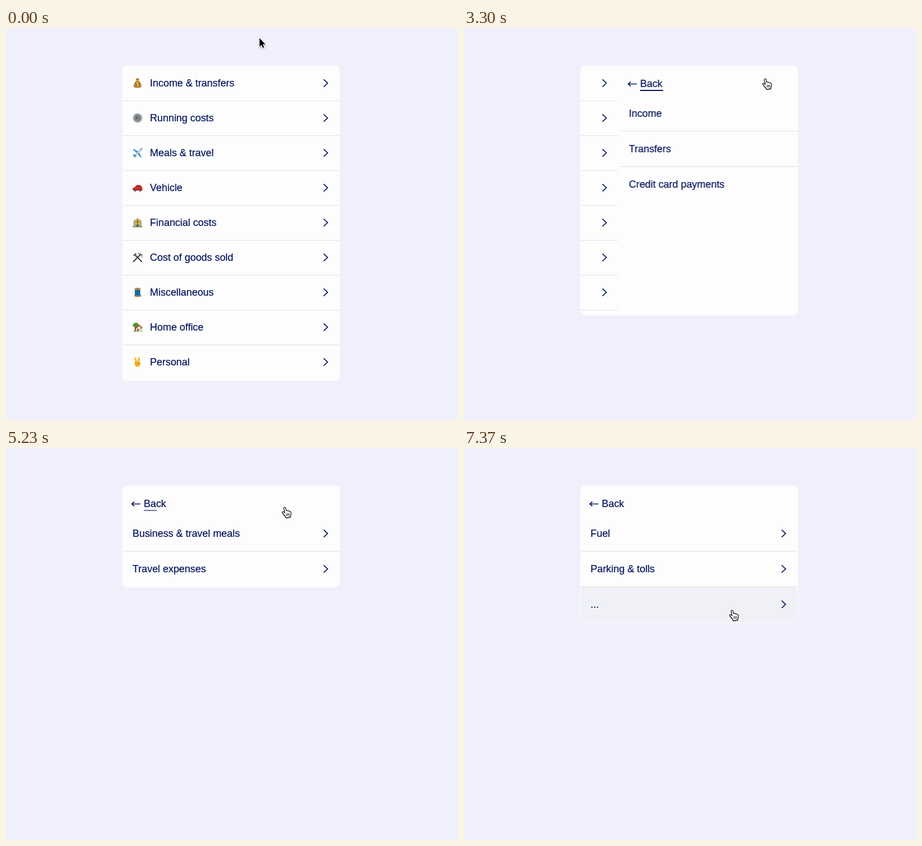
These frames come from a looping animation (804 by 697 pixels, 8000 ms). An HTML page:

```html
<!DOCTYPE html>
<html lang="en">
<head>
<meta charset="utf-8">
<title>Category menu</title>
<style>
:root { --ink: #02145a; --card: #fdfdfd; --hover: #f0f1f6; --loop: 8s; }
html, body { margin: 0; width: 100%; height: 100%; overflow: hidden; background: #f0f0fd; }
body { position: relative; font: 18px/20px "Liberation Sans", Arial, sans-serif; letter-spacing: -.05px; color: var(--ink); -webkit-text-stroke: .2px var(--ink); }
svg { position: absolute; overflow: visible; }
.card { position: absolute; left: 207px; top: 66.5px; width: 387px; height: 560.5px; border-radius: 8px; background: var(--card); overflow: hidden; animation: height var(--loop) infinite; }
.track { position: absolute; inset: 0; animation: slide var(--loop) infinite; }
.list { position: absolute; left: 0; top: 1px; width: 387px; }
.sub { left: 387px; padding-top: 53px; }
.row { position: relative; box-sizing: border-box; margin: 0 1px; height: 62.05px; border-bottom: 1px solid #dfe0e6; animation: var(--loop) linear infinite; }
.sub .row { height: 63.1px; }
.row:last-child { border-bottom-color: transparent; border-radius: 0 0 7px 7px; }
.main .row:first-child { border-radius: 7px 7px 0 0; }
.row span { position: absolute; left: 48.1px; top: 50%; transform: translateY(-50%); white-space: nowrap; }
.sub .row span { left: 17px; }
.row .icon { left: 17px; top: 50%; margin-top: -9px; width: 18px; height: 18px; }
.row .go { left: 356px; top: 50%; margin-top: -7px; width: 9px; height: 14px; }
.back { position: absolute; left: 16px; top: 21px; }
.back svg { left: 0; top: 5.5px; width: 16px; height: 11px; }
.back span { position: absolute; left: 22px; }
.back i { position: absolute; left: 22.3px; top: 21.5px; width: 40.5px; height: 2px; background: var(--ink); transform: scale(0); transform-origin: 0 50%; animation: var(--loop) linear infinite; }
.line { fill: none; stroke: var(--ink); stroke-width: 1.7; }
.cursor { position: absolute; left: 0; top: 0; animation: move var(--loop) infinite; }
.cursor svg { left: 0; top: 0; width: 1px; height: 1px; animation: var(--loop) step-end infinite; }
.cursor .arrow { animation-name: arrow; filter: drop-shadow(0 1px 1px #0006); }
.cursor .hand { left: .5px; animation-name: hand; filter: drop-shadow(0 1px .7px #0004); }

#income { animation: showA var(--loop) step-end infinite; }
#meals { animation: showB var(--loop) step-end infinite; }
#vehicle { animation: showC var(--loop) step-end infinite; }
.main .row:nth-child(1) { animation-name: hoverIncome; }
.main .row:nth-child(2) { animation-name: hoverRunning; }
.main .row:nth-child(3) { animation-name: hoverMeals; }
.main .row:nth-child(4) { animation-name: hoverVehicle; }
#meals .row:nth-child(2) { animation-name: hoverBusiness; }
#meals .row:nth-child(3) { animation-name: hoverTravel; }
#vehicle .row:nth-child(4) { animation-name: hoverMore; }
#income i { animation-name: lineIncome; }
#meals i { animation-name: lineMeals; }

@keyframes slide {
  0%, 20.88%, 43.98%, 56.25%, 74.75%, 87.31% { transform: none; animation-timing-function: cubic-bezier(.77, 0, .175, 1); }
  25.25%, 39.61%, 60.63%, 70.38%, 91.69%, 100% { transform: translateX(-387px); animation-timing-function: cubic-bezier(.77, 0, .175, 1); }
}
@keyframes height {
  0%, 20.82%, 44.03%, 56.25%, 74.75%, 87.31% { height: 560.5px; animation-timing-function: ease; }
  25.19%, 39.65%, 91.69%, 100% { height: 244px; animation-timing-function: ease; }
  60.63%, 70.38% { height: 181px; animation-timing-function: ease; }
}
@keyframes move {
  0%, .3% { transform: translate(451px, 18px); animation-timing-function: ease-in-out; }
  5.2% { transform: translate(687px, 34px); animation-timing-function: ease-in-out; }
  10.6% { transform: translate(551px, 20px); animation-timing-function: ease-in-out; }
  20%, 23.5% { transform: translate(482px, 92px); animation-timing-function: ease-in-out; }
  29.1%, 31.1% { transform: translate(711px, 130px); animation-timing-function: ease-in-out; }
  39.4%, 42.5% { transform: translate(535px, 91px); animation-timing-function: ease-in; }
  47.88% { transform: translate(539px, 186px); animation-timing-function: ease-out; }
  52.5%, 58.1% { transform: translate(530px, 222px); animation-timing-function: ease-in-out; }
  65.38% { transform: translate(495px, 106px); animation-timing-function: ease-out; }
  68.1%, 71.25% { transform: translate(492px, 98px); animation-timing-function: ease-in-out; }
  80.6%, 100% { transform: translate(476px, 289px); }
}
@keyframes arrow { 0%, 26.3% { opacity: 1; } 16.25%, 36.1%, 100% { opacity: 0; } }
@keyframes hand { 0%, 26.3% { opacity: 0; } 16.25%, 36.1%, 100% { opacity: 1; } }
@keyframes showA { 0% { opacity: 1; } 55%, 100% { opacity: 0; } }
@keyframes showB { 0%, 85%, 100% { opacity: 0; } 55% { opacity: 1; } }
@keyframes showC { 0% { opacity: 0; } 85%, 100% { opacity: 1; } }
@keyframes hoverIncome {
  0%, 16.25%, 26%, 42.5%, 47.5%, 73.1%, 76.9%, 100% { background: transparent; }
  18.75%, 23.75%, 44.5%, 45.7%, 75% { background: var(--hover); }
}
@keyframes hoverRunning {
  0%, 45.9%, 50.6%, 75%, 78.7%, 100% { background: transparent; }
  48.6%, 76.6% { background: var(--hover); }
}
@keyframes hoverMeals {
  0%, 48.4%, 60.5%, 76.5%, 80%, 100% { background: transparent; }
  50.9%, 58.75%, 78% { background: var(--hover); }
}
@keyframes hoverVehicle {
  0%, 78%, 91%, 100% { background: transparent; }
  80.5%, 89.5% { background: var(--hover); }
}
@keyframes hoverBusiness {
  0%, 61.1%, 65.2%, 100% { background: transparent; }
  63.3% { background: var(--hover); }
}
@keyframes hoverTravel {
  0%, 58.75%, 62.9%, 100% { background: transparent; }
  60.6%, 61.1% { background: var(--hover); }
}
@keyframes hoverMore { 0%, 89.5% { background: transparent; } 91.9%, 100% { background: var(--hover); } }
@keyframes lineIncome {
  0%, 23.5%, 28.9%, 36.1%, 55%, 100% { transform: scale(0); }
  26.3% { transform: scale(.85); }
  39.4%, 44% { transform: scale(1); }
}
@keyframes lineMeals {
  0%, 63.5%, 85%, 100% { transform: scale(0); }
  66.8%, 75% { transform: scale(1); }
}
</style>
</head>
<body>
<svg width="0" height="0">
  <symbol id="bag" viewBox="0 0 18 18">
    <path d="M6 1.2q3-1.2 6 0L10.8 4.6H7.2Z" fill="#a8762c"/>
    <path d="M7 5h4c3 2 5 6 4.800 9.500q-.3 2.700-3 2.700H5.200q-2.700 0-3-2.700C2 11 4 7 7 5Z" fill="#b98534"/>
    <path d="M6.500 4.700h5" stroke="#e5b84a" stroke-width="1.400" stroke-linecap="round"/>
    <path d="M11.300 8.800C9.500 7.500 6.700 8 7 9.800s4.300 1 4.200 3-3 2.200-4.600.8M9 7v8.500" fill="none" stroke="#4a2e0c" stroke-width="2.400"/>
    <path d="M11.300 8.800C9.500 7.500 6.700 8 7 9.800s4.300 1 4.200 3-3 2.200-4.600.8M9 7v8.500" fill="none" stroke="#ffe37a" stroke-width="1.200"/>
  </symbol>
  <symbol id="gear" viewBox="0 0 18 18">
    <circle cx="9" cy="9" r="7.600" fill="none" stroke="#858c91" stroke-width="2" stroke-dasharray="1.700 1.280"/>
    <circle cx="9" cy="9" r="5.600" fill="#b4babe" stroke="#7d8488" stroke-width="2.400"/>
    <circle cx="9" cy="9" r="3.200" fill="#8b9297" stroke="#4b5054" stroke-width="1.200"/>
    <path d="M9 9 12.500 6M9 9v4" stroke="#d6dadc"/>
    <circle cx="9" cy="9" r="1.300" fill="#33383b"/>
  </symbol>
  <symbol id="plane" viewBox="0 0 18 18">
    <path d="M11 7 2 2 .8 3.400 8 9.500ZM11 7l5 9-1.400 1.200L8.500 10ZM5 12.500l-4-.7-.7.9L4 14.500ZM5.500 13l.7 4-.9.700L3.500 14Z" fill="#2f97c9"/>
    <path d="M17.500.5c.6 1.200-.5 3-2 4.500L4.500 15.700q-2 1.600-2.300 0L13 2.500Q16-.2 17.500.5Z" fill="#c9dbe4" stroke="#6e94a8" stroke-width=".6"/>
    <path d="M15 2.200l1 .9M2.500 15.500l3-3" stroke="#175f8c" stroke-width="1.200"/>
  </symbol>
  <symbol id="car" viewBox="0 0 18 18">
    <path d="M.5 10.500Q1.500 8.500 4 8l3-3.300Q8 4 10 4h3q2 .2 2.800 2.200l1.500 2.300q.7 3.200 0 5.300H2Q0 13.500.5 10.500Z" fill="#e3281f"/>
    <path d="M5.500 8 8 5.400h2V8ZM11 5.400h2.300q1 .2 1.700 2.600h-4Z" fill="#434e5c"/>
    <path d="M1 10.600h2.500M.8 12.600h16.500" stroke="#8e0f12"/>
    <circle cx="4.700" cy="13.600" r="2.100" fill="#25272b"/><circle cx="13.500" cy="13.600" r="2.100" fill="#25272b"/>
    <circle cx="4.700" cy="13.600" r="1" fill="#b7babd"/><circle cx="13.500" cy="13.600" r="1" fill="#b7babd"/>
  </symbol>
  <symbol id="bank" viewBox="0 0 18 18">
    <path d="M2 6.500h14V16H2Z" fill="#6d7165"/>
    <path d="M3.500 7v8.500M6 7v8.500M12 7v8.500M14.500 7v8.500" stroke="#d9d3ad" stroke-width="1.400"/>
    <path d="M.5 6.800 9 .8l8.500 6Z" fill="#b4ad86"/>
    <path d="M.5 15.300h17V17.500H.5Z" fill="#9b956f"/>
    <path d="M6 3.500h6V12H6Z" fill="#e9c22e"/>
    <path d="M10.700 5.700C9 4.700 7.300 5.500 7.600 6.800s2.900.7 2.800 2-1.900 1.600-3.100.5M9 4.500v6.300" fill="none" stroke="#5b4a08"/>
    <path d="M7.300 12.800h3.400v3H7.300Z" fill="#4a4d48"/>
  </symbol>
  <symbol id="tools" viewBox="0 0 18 18">
    <path d="M4 4 16.500 16.500M14 4 1.500 16.500" stroke="#3a3433" stroke-width="1.800" stroke-linecap="round"/>
    <path d="M8.500 1.600q6-.4 7.800 1.800t.8 6.300q-1-4.500-3-5.500T8.500 1.600Z" fill="#54585b"/>
    <path d="M1 5.200 5 1.300l2.300.5L6 3.300 6.700 4.800 4.800 6.700 3.300 6 2.500 6.800Z" fill="#606569"/>
  </symbol>
  <symbol id="spool" viewBox="0 0 18 18">
    <path d="M4.200 3h9.600v12H4.200Z" fill="#1878b5"/>
    <path d="M4.200 5.800l9.600-1M4.200 8.200l9.600-1M4.200 10.600l9.600-1M4.200 13l9.600-1" stroke="#0b4f83" stroke-width=".8"/>
    <ellipse cx="9" cy="2.600" rx="6" ry="1.900" fill="#d79a54"/><ellipse cx="9" cy="2.400" rx="1.700" ry=".6" fill="#6e411a"/>
    <path d="M3 14.200q6 2.300 12 0v1.600q-6 3-12 0Z" fill="#b9742f"/>
    <path d="M13.500 12.500q2 1 1.800 4.500" fill="none" stroke="#1878b5" stroke-width=".8"/>
  </symbol>
  <symbol id="house" viewBox="0 0 18 18">
    <path d="M4 8h2v7H4Z" fill="#7a4b22"/>
    <path d="M1 7.500Q-.5 4.500 2 3.200 3.500.2 6.500 1.200 10 .5 10.500 4q1 3-2 4.500-4 2-7.500-1Z" fill="#4a9a2c"/>
    <path d="M2 14.500h15.500V17H2Z" fill="#74ad3e"/>
    <path d="M6.800 10.500 12 6l4.700 4.500v6H6.800Z" fill="#f1e3c8"/>
    <path d="M5.500 11.300 11.800 5.500l6 5.600" fill="none" stroke="#a6402a" stroke-width="1.800"/>
    <path d="M8.300 11.800h2.500v4.700H8.300Z" fill="#8a4b2a"/><path d="M12.500 11.500h2.500V14h-2.500Z" fill="#5fa4d0"/>
  </symbol>
  <symbol id="peace" viewBox="0 0 18 18">
    <path d="M7.300 10 4.900 2.700M10.300 10l1.300-8" stroke="#d78d10" stroke-width="3.200" stroke-linecap="round"/>
    <path d="M7.300 10 4.900 2.700M10.300 10l1.300-8" stroke="#fcc02f" stroke-width="2.600" stroke-linecap="round"/>
    <path d="M4 10q3-2.500 9-1.200 1.700 1.200 1 4-1 4.700-5 4.700T3.800 13.500Z" fill="#fbb829"/>
    <path d="M3.500 10.500q2-1.300 5 .2t1 2.700l-3-.6M11.200 9.500v3M13 9.800v2.700" fill="none" stroke="#c67c0b" stroke-width=".8"/>
  </symbol>
  <symbol id="chevron" viewBox="0 0 9 14"><path class="line" d="M1 .4 8 7 1 13.600"/></symbol>
  <symbol id="left" viewBox="0 0 16 11"><path class="line" d="M16 5.500H1M5.300 1.300 1 5.500l4.300 4.200"/></symbol>
</svg>

<div class="card"><div class="track">
  <div class="list main"></div>
  <div class="list sub" id="income"></div>
  <div class="list sub" id="meals"></div>
  <div class="list sub" id="vehicle"></div>
</div></div>

<div class="cursor">
  <svg class="arrow"><path d="M0 0V15.200L3.500 11.900 5.800 17.300 8.100 16.300 5.800 11H10.400Z" stroke="#fff" stroke-width="1.800" paint-order="stroke"/></svg>
  <svg class="hand" fill="none" stroke="#111" stroke-width="1.200" stroke-linejoin="round" stroke-linecap="round">
    <path fill="#fff" d="M-1.900 1C-2.100-.7.900-1.300 1.400.800L2.600 5.500C3.500 4.600 5.200 4.900 5.600 6 6.600 5.400 8 5.800 8.300 6.900 9.400 6.500 10.800 7.100 11 8.700 11.200 10.900 11.100 12.700 10.200 14.400L9.600 17.500 7.500 16.700 5.800 17.800H1.700L1 15.600C-.4 14.600-1.200 13.600-2.600 11.400-3.600 10-5.400 8.400-4.200 7.500-3 6.600-1.500 7.800 0 9.600Z"/>
    <path d="M3.300 10.300v4M5.600 10.300v4M7.900 10.300v4" stroke-width="1"/>
  </svg>
</div>

<script>
const use = (id, cls) => `<svg class="${cls}"><use href="#${id}"/></svg>`;
const row = (label, icon) =>
  `<div class="row">${icon ? use(icon, "icon") : ""}<span>${label}</span>${use("chevron", "go")}</div>`;
const back = `<div class="back">${use("left", "")}<span>Back</span><i></i></div>`;

const main = {
  bag: "Income &amp; transfers", gear: "Running costs", plane: "Meals &amp; travel",
  car: "Vehicle", bank: "Financial costs", tools: "Cost of goods sold",
  spool: "Miscellaneous", house: "Home office", peace: "Personal"
};
const subs = {
  income: ["Income", "Transfers", "Credit card payments"],
  meals: ["Business &amp; travel meals", "Travel expenses"],
  vehicle: ["Fuel", "Parking &amp; tolls", "..."]
};

document.querySelector(".main").innerHTML =
  Object.entries(main).map(([icon, label]) => row(label, icon)).join("");
for (const [id, labels] of Object.entries(subs))
  document.getElementById(id).innerHTML = back + labels.map(label => row(label)).join("");
</script>
</body>
</html>
```
